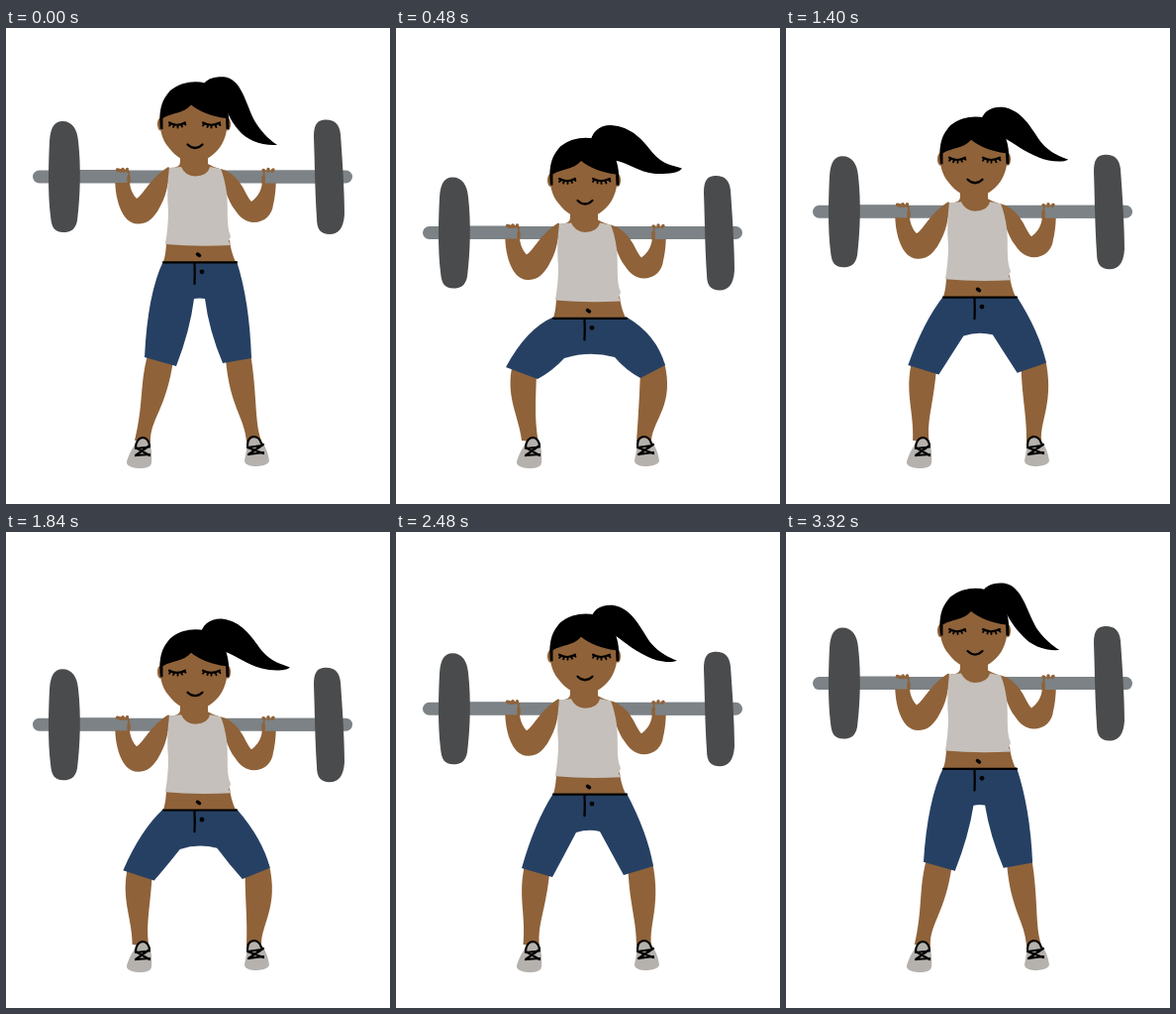
Animation, 388 px wide and 480 px high, one loop 3360 ms. Source, as an HTML page:

```html
<!DOCTYPE html>
<html lang="en">
<head>
<meta charset="utf-8">
<title>Barbell squat</title>
<style>
html, body { margin: 0; width: 100%; height: 100%; overflow: hidden; background: #fff; }
svg { display: block; }
.skin { fill: #8f6239; }
.bar { fill: #7c8285; }
.plate { fill: #4a4b4d; }
.shirt { fill: #c5c0bb; }
.shoe { fill: #b5b1ad; }
.denim { fill: #264063; }
.line { fill: none; stroke: #000; stroke-width: 2.2; stroke-linecap: round; stroke-linejoin: round; }
.lash { stroke-width: 1.8; }
.grip { fill: none; stroke: #8f6239; stroke-width: 3.4; stroke-linecap: round; }
</style>
</head>
<body>
<svg width="388" height="480" viewBox="0 0 388 480">
  <path id="legL" class="skin"/>
  <path id="legR" class="skin"/>

  <path class="shoe" d="M131 419Q125 427 122 437Q121 443 134 444Q147 444 147 438Q148 427 145 418Q138 409 131 419Z"/>
  <path class="line" d="M131 422Q132 414 138 413Q143 413 145 420M131 423L145 431M145 421L131 431M131 424L145 422.500M131 431L145 430"/>
  <path class="shoe" d="M244 418Q243 427 241 436Q241 442 254 442Q266 441 266 436Q264 424 258 416Q250 409 244 418Z"/>
  <path class="line" d="M244 421Q244 413 250 412Q256 412 258 419M244 423L260 429M260 420L245 430M244 423L259 421M245 430L260 428"/>

  <path id="shorts" class="denim"/>

  <g id="body">
    <rect class="bar" x="27" y="143.500" width="323" height="13" rx="6.500"/>

    <!-- arms -->
    <path class="skin" d="M165 141C164 160 162 170 153 185C147 194 141 197.500 134 197.500C125 198 119 191 115 181C111 170 110 160 110 144L125 144C124 154 125 165 132 172C139 168 145 152 164 140Z"/>
    <path class="skin" d="M216 142C220 160 224 174 231 183C236 191 243 196 250 196C262 196 269 188 270 178C272 170 273 160 273 144L260 144C259 158 259 167 248 175C241 168 238 148 217 142Z"/>

    <!-- bar in front of the hands -->
    <path class="bar" d="M60 143H123V156H60ZM261.500 143.500H330V156.500H261.500Z"/>
    <path class="grip" d="M112.500 143L116 144M118 142.500L119 144M122.500 142.500L122 144M124 150L124 155M260 143.500L261 144M265 142.500L265 144M270 143L269 144M260 150L260 156"/>
    <path class="plate" d="M57 94C67 94 72 102 73 114C76 140 75 170 72 194C70 204 65 206 58 206C49 206 46 201 45 190C42 165 43 135 44 114C45 100 49 94 57 94Z"/>
    <path class="plate" d="M322 92.500C332 92 337 97 338 107C340 135 342 165 342 188C341 202 336 208 327 208C318 208 314 203 314 192C312 160 312 135 311 110C311 98 314 93 322 92.500Z"/>

    <!-- torso -->
    <path class="skin" d="M176 125H204V137Q209 140 216 142L214 155H172L166 141Q176 141 176 135ZM162 214H226Q227 225 232 236H159Q162 226 162 214Z"/>
    <path class="shirt" d="M165 141L177 140Q181 149 191 149.500Q204 149 206 140L217 142Q221 152 223 166C225 185 222 198 227 210L225 215L227 219Q193 221 161 218Q164 200 164 185Q162 162 165 141Z"/>
    <path class="line" d="M193.500 228L195.500 229.500" style="stroke-width:3.500"/>
    <path class="line" d="M159 236.300H233M190.500 237Q191 248 190.500 258"/>
    <circle cx="198" cy="245.800" r="2.400"/>

    <!-- head -->
    <path id="tail"/>
    <ellipse class="skin" cx="156" cy="97" rx="3" ry="6.500"/>
    <ellipse class="skin" cx="224" cy="97" rx="3" ry="6.500"/>
    <path class="skin" d="M156 85C154 102 158 113 164 120C172 131 181 135 190 135C201 135 211 128 217 119C222 111 225 101 223 85Q190 50 156 85Z"/>
    <path d="M156 102C154 81 158 72 166 63C180 52 198 52 210 59C221 68 226 80 225.500 102L222.500 102L222 91C207 89 197 85 187 77.500C179 87 168 85 158.500 91L158.500 102Z"/>
    <path class="line" d="M165 95.500Q173 100 181 95.500M199 95.500Q207 100 216 95.500"/>
    <path class="line lash" d="M166.500 97L165 98.500M170 98L169 100M173.500 98V100.500M177 97.500L178 99.500M180 96.500L181.500 97.500"/>
    <path class="line lash" d="M200 97L199 98.500M204 98L203.500 100M207.500 98V100.500M211.500 98L212.500 100M215 96.500L216.500 98"/>
    <path class="line" d="M183.500 117.500Q191 124.500 198.500 117.500"/>
  </g>
</svg>
<script>
const CYCLE = 1120, STEP = 40, DEPTH = 56.5;
const $ = id => document.getElementById(id);

// Each part: the standing, (half way) and lowest outline.
const shapes = {
  legL: [
    'M143 330C135 360 139 380 130 416L146 418C145 395 162 385 169 335Z',
    'M118 338C110 372 124 390 127 416L144 418C140 395 141 380 142 346Z'],
  legR: [
    'M222 334C226 382 241 392 243 417L258 416C251 398 254 370 247 328Z',
    'M247 346C246 370 245 390 243 417L258 416C260 394 282 380 271 337Z'],
  shorts: [
    'M159 235Q143 268 140 332L172 341Q186 305 190 273Q196 272 201 273Q205 305 219 338L248 333Q246 275 233 235Z',
    'M159 263.5Q140 293 127 339L158 348Q172 322 182 303Q194 299 206 302Q218 324 230 346L260 337Q254 303 233 263.5Z',
    'M159 291.5Q132 303 111 342L143 354Q158 346 170 333Q195 325 221 332Q232 345 247 353L272 340Q263 309 233 291.5Z'],
  tail: [
    'M198 63C198 51 212 48 222 49.5C240 53 243 82 254 98C260 107 268 114 274 118C258 119 243 113 235 103C225 91 223 83 220 74Z',
    'M196 61C197 49 205 41.5 217 41.5C238 43 249 56 259 69C270 82 280 82 289 85C286 90 272 91 262 90.5C245 89 232 78 220 77Z']
};

const numbers = path => path.match(/[\d.]+/g).map(Number);

// Blends outlines; x and y may run at different rates.
function blend(list, px, py) {
  const first = numbers(list[0]), last = numbers(list.at(-1));
  const half = list[2] && numbers(list[1]);
  let i = 0;
  return list[0].replace(/[\d.]+/g, () => {
    const p = i % 2 ? py : px, a = first[i], b = last[i];
    const bend = half ? half[i] - (a + b) / 2 : 0;
    i++;
    return (a + (b - a) * p + 4 * p * (1 - p) * bend).toFixed(2);
  });
}

// Eased descent, short hold, then a rise that arrives with some speed.
function squat(t) {
  if (t < 480) { const x = t / 480; return x * x * (3 - 2 * x); }
  if (t < 560) return 1;
  const x = (CYCLE - t) / 600;
  return x * x * (3 - 2 * x) + 0.56 * x * (1 - x) ** 2;
}

function draw(now) {
  const t = Math.floor(now / STEP) * STEP % CYCLE, p = squat(t);
  for (const id in shapes) {
    const px = id === 'tail' ? p ** 0.6 : p;
    $(id).setAttribute('d', blend(shapes[id], px, p));
  }
  $('body').setAttribute('transform', `translate(0 ${(p * DEPTH).toFixed(2)})`);
}

const start = performance.now();
function loop() {
  draw(performance.now() - start);
  requestAnimationFrame(loop);
}
loop();
</script>
</body>
</html>
```
